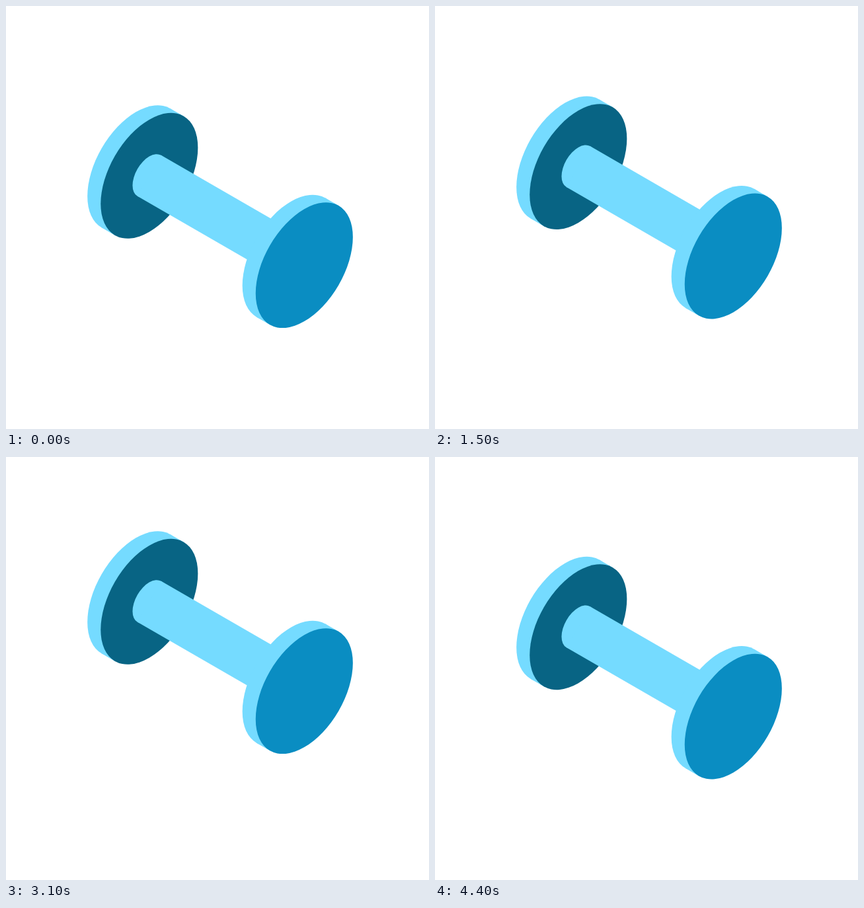
An HTML page with a canvas for the animation above (4.5 s loop, 640 by 640 pixels).

```html
<!DOCTYPE html>
<html lang="en">
<head>
<meta charset="utf-8">
<title>Dumbbell</title>
<style>
  html, body { margin: 0; width: 100%; height: 100%; overflow: hidden; background: #fff; }
  canvas { display: block; width: 640px; height: 640px; }
</style>
</head>
<body>
<canvas id="stage" width="640" height="640"></canvas>
<script>
const ctx = document.getElementById('stage').getContext('2d');

const LOOP = 4500, STEP = 100, REP = 1200;
const LIGHT = '#75dbff', MID = '#0a8dc2', DARK = '#086484';
const CENTER_X = 324, REST_Y = 318.7;
const INNER = 151.6, OUTER = 180;   // plate faces, measured along the axis
const PLATE_R = 104, BAR_R = 35.8;
const SIN_E = Math.sqrt(1 / 3), COS_E = Math.sqrt(2 / 3);   // isometric camera

const TURN_START = 3475, TURN_TIME = 830;

// Height of one repetition, one value per step
const LIFT = [0, 2.2, 7.2, 13.7, 21, 28.5, 35, 38, 38, 32.4, 19, 5.6];

function easeInOut(p, power) {
  p = Math.min(1, Math.max(0, p));
  return p < 0.5 ? Math.pow(2 * p, power) / 2 : 1 - Math.pow(2 - 2 * p, power) / 2;
}

function pose(time) {
  const turn = easeInOut((time - TURN_START) / TURN_TIME, 4);
  const resting = time > 3 * REP;
  return {
    angle: Math.PI / 4 - turn * 2 * Math.PI,
    y: resting ? REST_Y + 0.4 : REST_Y - LIFT[(time % REP) / STEP],
  };
}

function draw(time) {
  const { angle, y } = pose(time);
  // Both ends look alike, so the axis always points at the viewer
  const side = Math.sin(angle) < 0 ? -1 : 1;
  const ax = side * Math.cos(angle);
  const ay = side * Math.sin(angle) * SIN_E;
  const squash = Math.abs(Math.sin(angle)) * COS_E;
  const length = Math.hypot(ax, ay);

  function disc(at, radius, color) {
    ctx.fillStyle = color;
    ctx.beginPath();
    ctx.ellipse(at * length, 0, radius * squash, radius, 0, 0, 2 * Math.PI);
    ctx.fill();
  }

  function cylinder(from, to, radius, face) {
    disc(from, radius, LIGHT);
    ctx.fillRect(from * length, -radius, (to - from) * length, 2 * radius);
    disc(to, radius, face);
  }

  ctx.setTransform(1, 0, 0, 1, 0, 0);
  ctx.fillStyle = '#fff';
  ctx.fillRect(0, 0, 640, 640);
  ctx.translate(CENTER_X, y);
  ctx.rotate(Math.atan2(ay, ax));

  cylinder(-OUTER, -INNER, PLATE_R, DARK);
  cylinder(-INNER, INNER, BAR_R, LIGHT);
  cylinder(INNER, OUTER, PLATE_R, MID);
}

function tick() {
  const time = performance.now() % LOOP;
  draw(Math.floor(time / STEP) * STEP);
  requestAnimationFrame(tick);
}
tick();
</script>
</body>
</html>
```
